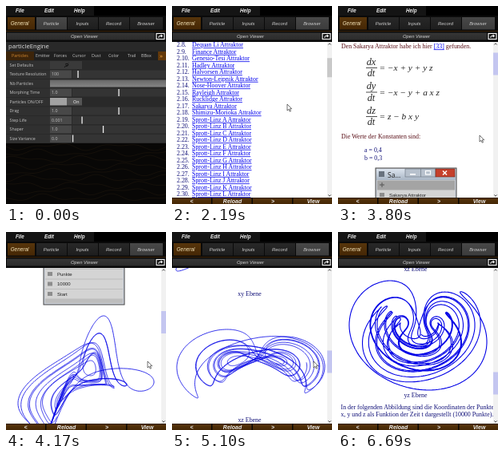
Animation of 200x248 px, one loop 6980 ms. Source, as an HTML page:

```html
<!DOCTYPE html>
<html lang="de">
<head>
<meta charset="utf-8">
<title>Particle engine browser</title>
<style>
  html, body { margin: 0; width: 100%; height: 100%; overflow: hidden; background: #080808; }
  svg { display: block; width: 100vw; height: 100vh; }
  text { white-space: pre; }
  .ui { font: italic 5.9px "Liberation Sans", Arial, sans-serif; fill: #cfcfcf; }
  .strong { font-size: 6.3px; font-weight: bold; fill: #eee; }
  .foot { font-size: 7px; }
  .par { font: 5.3px "Open Sans", "Noto Sans", sans-serif; fill: #c4c4c4; }
  .doc { font: 7.9px "Liberation Serif", "Times New Roman", serif; fill: #101078; }
  .link { fill: #0000ee; text-decoration: underline; }
  .math { font: italic 11.3px "Liberation Serif", "Times New Roman", serif; fill: #222; }
  .curve { fill: none; stroke: #0000e6; stroke-linejoin: round; }
</style>
</head>
<body>
<svg id="stage" viewBox="0 0 200 248"></svg>
<script>
const LOOP = 6980;
const VIEW = { top: 45, height: 195 };
const stage = document.getElementById("stage");

const rect = (x, y, w, h, fill, extra = "") =>
  `<rect x="${x}" y="${y}" width="${w}" height="${h}" fill="${fill}" ${extra}/>`;
const text = (x, y, s, cls, extra = "") =>
  `<text x="${x}" y="${y}" class="${cls}" ${extra}>${s}</text>`;
const mid = (x, y, s, cls, extra = "") => text(x, y, s, cls, `text-anchor="middle" ${extra}`);
const path = (d, extra) => `<path d="${d}" ${extra}/>`;
const gradient = (id, a, b) =>
  `<linearGradient id="${id}" x2="0" y2="1"><stop stop-color="${a}"/><stop offset="1" stop-color="${b}"/></linearGradient>`;

// --- Application frame -------------------------------------------------

function header() {
  const tabs = [["General", 2, 34, 17], ["Particle", 38, 38, 56.5], ["Inputs", 77, 38, 95.5],
                ["Record", 116, 38, 134.5], ["Browser", 155, 41, 175]];
  return rect(0, 0, 200, 45, "#0a0a0a") + rect(0, 0, 110, 12, "#141414") + rect(110, 0, 90, 12, "#000") +
    [["File", 12], ["Edit", 48], ["Help", 85]].map(([s, x]) => text(x, 8, s, "ui strong")).join("") +
    tabs.map(([s, x, w, c], i) =>
      rect(x, 14, w, 15.5, i ? "url(#dark)" : "url(#brown)", `id="tab${i}"`) +
      mid(c, 24, s, "ui", i ? "" : 'style="font-size:6.4px;fill:#f6e6bb"')).join("") +
    rect(0, 31, 200, 1, "#3a2207") +
    rect(1, 33.5, 185, 9, "url(#bar)") + mid(98, 40.3, "Open Viewer", "ui") +
    rect(188, 34.5, 10, 7, "#080808", 'stroke="#f4f4f4" stroke-width="1.2"') +
    path("M191 40v-1.5q0-1 1-1h3M193.5 35.8l1.9 1.7-1.9 1.7", 'fill="none" stroke="#f4f4f4" stroke-width="1.1"');
}

function parameters() {
  const names = ["Set Defaults", "Texture Resolution", "Nb Particles", "Morphing Time",
    "Particles ON/OFF", "Drag", "Step Life", "Shaper", "Size Variance"];
  const sliders = { 1: ["100", 90], 3: ["1.0", 141], 5: ["1.0", 141], 6: ["0.001", 95], 7: ["1.0", 121.5], 8: ["0.0", 83.5] };
  const pages = [["Particles", 7], ["Emitter", 37], ["Forces", 60], ["Cursor", 83], ["Dust", 107],
                 ["Color", 128], ["Trail", 152], ["BBox", 169]];
  let out = rect(0, 45, 200, 127, "#292929") +
    text(3, 53.3, "particleEngine", "par", 'style="font-size:7.7px;fill:#e2e2e2"') +
    rect(0, 57, 200, 11, "#202020") + rect(0, 57, 35, 11, "#3c240a") + rect(190, 57, 10, 11, "#63390a") +
    pages.map(([s, x], i) => `<svg x="${x}" y="57" width="${i ? 17.5 : 30}" height="11">` +
      text(0, 7.3, s, "par", i ? "" : 'style="fill:#d38a32"') + "</svg>").join("") +
    text(192, 64.8, "»", "par", 'style="font-size:8px;fill:#f0a540"');
  names.forEach((name, i) => {
    const y = 69 + i * 11.5;
    out += rect(0, y, 55, 10.5, "#303030") + text(4.5, y + 6.9, name, "par");
    if (i === 0) {
      out += rect(55, y, 40, 10, "#3a3a3a") +
        path(`M73 ${y + 8}l2-2.5 2 .5M74 ${y + 4}l3-1 1 2-3 1.5M78 ${y + 2}h.5`, 'fill="none" stroke="#111" stroke-width="1"');
    } else if (i === 2) {
      out += rect(55, y + .5, 145, 9, "url(#steel)");
    } else if (i === 4) {
      out += rect(55, y, 21, 9.5, "#a2a2a2") + rect(76, y, 19, 9.5, "#555") + text(84, y + 6.9, "On", "par", 'style="fill:#fff"');
    } else {
      const [value, x] = sliders[i];
      out += rect(55, y, 27, 10, "#484848") + text(57, y + 6.9, value, "par") +
        rect(83, y, 117, 10, "#343434") + rect(x - .6, y + .5, 1.3, 9, "#eee");
    }
  });
  out += rect(0, 172, 200, 76, "#080706");
  for (let k = 0; k < 9; k++) {
    let d = "";
    for (let x = 0; x <= 200; x += 5) {
      const y = 176 + k * 8 + 3 * Math.sin(x / 13 + k * 1.7) + 2 * Math.sin(x / 7 - k);
      d += `${d ? "L" : "M"}${x} ${y.toFixed(1)}`;
    }
    out += path(d, 'fill="none" stroke="#15100a" stroke-width="1"');
  }
  return out;
}

function footer() {
  return rect(0, 240, 200, 8, "#090603") +
    [["&lt;", 0, 24.5], ["Reload", 50.5, 75.5], ["&gt;", 101, 126], ["View", 151.5, 176.5]].map(([s, x, c]) =>
      rect(x, 240.5, 49, 7.5, "url(#brown)") + mid(c, 246.6, s, "ui strong foot")).join("");
}

// --- Browser pages -----------------------------------------------------

function listPage() {
  const names = ["Aizawa", "Anishchenko-Astakhov", "Arneodo", "Bouali", "Burke-Shaw", "Chen-Celikovsky", "Coullet",
    "Dequan Li", "Finance", "Genesio-Tesi", "Hadley", "Halvorsen", "Newton-Leipnik", "Nose-Hoover", "Rayleigh",
    "Rucklidge", "Sakarya", "Shimizu-Morioka", ...[..."ABCDEFGHIJKLMNOPQRS"].map(s => "Sprott-Linz " + s)];
  return text(5, 70, "Seltsame Attraktoren", "doc", 'style="font-size:13px"') +
    text(6, 92, "1.", "doc") + text(25, 92, "Einleitung", "doc link") +
    text(6, 104, "2.", "doc") + text(25, 104, "Attraktoren", "doc link") +
    names.map((s, i) => {
      const y = 117.8 + i * 8.5;
      return text(6, y, `2.${i + 1}.`, "doc") + text(25, y, s + " Attraktor", "doc link");
    }).join("");
}

// Euler run of the Sakarya system, without its slow start along the z axis
function trajectory() {
  const a = .4, b = .3, h = .004, skip = 1000, steps = 15000, pts = [];
  let x = 1, y = -1, z = 1;
  for (let n = 0; n < steps; n++) {
    [x, y, z] = [x + h * (-x + y + y * z), y + h * (-x - y + a * x * z), z + h * (z - b * x * y)];
    if (n >= skip && n % 2 === 0) pts.push([x, y, z]);
  }
  return pts;
}

function plot(pts, project, [x0, y0, x1, y1], width) {
  const flat = pts.map(project);
  const range = i => flat.reduce(([lo, hi], p) => [Math.min(lo, p[i]), Math.max(hi, p[i])], [Infinity, -Infinity]);
  const [ul, uh] = range(0), [vl, vh] = range(1);
  const d = flat.map(([u, v]) =>
    (x0 + (u - ul) / (uh - ul) * (x1 - x0)).toFixed(1) + " " + (y1 - (v - vl) / (vh - vl) * (y1 - y0)).toFixed(1)).join("L");
  return path("M" + d, `class="curve" stroke-width="${width}"`);
}

function dialog() {
  let out = rect(47, 266, 101, 172, "#c9ced6", 'stroke="#444" stroke-width="1"') +
    rect(48, 267, 99, 14, "url(#title)") + rect(51, 270, 7, 7, "#68727e") +
    text(62, 277.5, "Sa...", "par", 'style="font-size:8.5px;fill:#222"') +
    rect(84, 267, 38, 10, "#b7c1cd", 'stroke="#65707c" stroke-width=".6"') + rect(103, 267, .6, 10, "#65707c") +
    rect(122, 267, 24, 10, "#c5402c", 'stroke="#6b261d" stroke-width=".6"') +
    rect(90, 273, 7, 1.6, "#fff") + rect(109.5, 269.5, 6, 4.5, "none", 'stroke="#fff" stroke-width="1.2"') +
    path("M131 269.5l5 5m0-5l-5 5", 'stroke="#fff" stroke-width="1.5"') +
    rect(49, 281, 97, 155, "#bdbdbd") + rect(49, 282, 97, 11, "#a4a4a4") +
    path("M52 287h6m-3-3v6", 'stroke="#555" stroke-width="1"');
  ["Sakarya Attraktor", "Parameter", "a = 0,4", "b = 0,3", "Startwerte", "x = 1", "y = -1", "z = 1", "Punkte", "10000", "Start"].forEach((s, i) => {
    const y = 294 + i * 12.5;
    out += rect(49, y, 97, 11.5, "#d4d4d4") + rect(52, y + 3, 6, 5, "#8d8d8d") +
      text(64, y + 7.8, s, "par", 'style="font:6px Liberation Sans,Arial,sans-serif;fill:#222"');
  });
  return out;
}

function articlePage() {
  const pts = trajectory();
  const equations = [["x", "= −x + y + y z"], ["y", "= −x − y + a x z"], ["z", "= z − b x y"]];
  const dark = 'style="fill:#5a1018"';
  return text(4, 82, "Sakarya Attraktor", "doc", 'style="font-size:12px;font-weight:bold"') +
    text(4, 116.3, 'Den Sakarya Attraktor habe ich hier <tspan class="link">[33]</tspan> gefunden.', "doc", dark) +
    equations.map(([v, s], i) => {
      const y = 140.5 + i * 30.5;
      return mid(41.5, y - 4, "d" + v, "math", 'style="font-size:12.3px"') + rect(35, y - .4, 14, .8, "#222") +
        mid(41.5, y + 10.5, "dt", "math", 'style="font-size:12.3px"') + text(51.5, y + 3.5, s, "math");
    }).join("") +
    text(4, 229, "Die Werte der Konstanten sind:", "doc", dark) +
    text(33, 246, "a = 0,4", "doc") + text(33, 256, "b = 0,3", "doc") +
    dialog() +
    plot(pts, ([x, y, z]) => [(y - x) * .866, z - (x + y) / 2], [15, 452, 185, 607], .8) +
    mid(97, 614.5, "3D Ansicht (Isometrie)", "doc") +
    plot(pts, ([x, y]) => [x, y], [5, 646, 192, 742], .8) +
    mid(97, 772.5, "xy Ebene", "doc") +
    plot(pts, ([x, , z]) => [x, z], [6, 815, 191, 901], .8) +
    mid(97, 930.5, "xz Ebene", "doc") +
    plot(pts, ([, y, z]) => [y, z], [14, 943, 186, 1080], 1.1) +
    mid(97, 1088.5, "yz Ebene", "doc") +
    text(3.5, 1104, "In der folgenden Abbildung sind die Koordinaten der Punkte", "doc") +
    text(3.5, 1113, "x, y und z als Funktion der Zeit t dargestellt (10000 Punkte).", "doc");
}

// --- Scene -------------------------------------------------------------

stage.innerHTML =
  "<defs>" + gradient("brown", "#57350b", "#452705") + gradient("dark", "#282828", "#1e1e1e") +
  gradient("lit", "#484848", "#3c3c3c") + gradient("bar", "#363636", "#2b2b2b") +
  gradient("steel", "#676767", "#858585") + gradient("title", "#dce4ee", "#a9b6c5") +
  `<clipPath id="view">${rect(0, VIEW.top, 194, VIEW.height, "#fff")}</clipPath></defs>` +
  header() + `<g id="params">${parameters()}</g>` +
  `<g id="browser">${rect(0, VIEW.top, 200, VIEW.height, "#fff")}` +
  `<g clip-path="url(#view)"><g id="list">${listPage()}</g><g id="article">${articlePage()}</g></g>` +
  rect(194, VIEW.top, 6, VIEW.height, "#f1f1f1") + rect(194, 49, 6, 28, "#c9c9c9", 'id="thumb"') +
  path("M195.3 48.5l1.7-1.7 1.7 1.7M195.3 236.5l1.7 1.7 1.7-1.7", 'fill="none" stroke="#404040" stroke-width="1"') +
  footer() + "</g>" +
  '<g id="cursor"><circle id="glow" cx="1" cy="3" r="5.5" fill="#ffe000" opacity=".8"/>' +
  path("M0 0v8l1.9-1.7 1.3 2.9 1.3-.6-1.3-2.8h2.5z", 'fill="#fff" stroke="#111" stroke-width=".6"') + "</g>";

const $ = id => document.getElementById(id);
const show = (id, on) => $(id).setAttribute("display", on ? "inline" : "none");

const CLICKS = [[1210, 1240], [2800, 2850]];
const LIST_SCROLL = [[0, 0], [1990, 32], [2060, 63], [2130, 95], [2190, 126]];
const ARTICLE_SCROLL = [[0, 0], [3800, 63], [3870, 126], [3930, 189], [4000, 221], [4070, 284], [4130, 347], [4200, 378],
  [4370, 441], [4400, 473], [4470, 504], [4830, 567], [4870, 599], [4930, 630], [5100, 693], [5130, 756],
  [5530, 788], [5600, 819], [5670, 851], [5730, 882]];
const CURSOR = [[660, 199, 35], [720, 184, 29], [840, 160.5, 19], [1510, 160.5, 19], [1650, 163, 50], [1900, 146, 119],
  [2190, 144, 123], [2490, 144, 123], [2620, 95, 126], [2770, 60, 122], [2880, 60, 122], [3030, 105, 140],
  [3180, 154, 158], [3210, 158, 159], [3300, 186, 163], [3400, 177, 162], [5960, 177, 162], [5990, 176.5, 162.5],
  [6160, 176.5, 162.5], [6260, 176, 163], [6430, 176, 163], [6510, 184, 177], [6600, 177, 209], [6690, 168, 238]];

const stepAt = (keys, t) => keys.filter(([at]) => at <= t).pop()[1];

function cursorAt(t) {
  const i = CURSOR.findIndex(([at]) => at > t);
  const [t0, x0, y0] = CURSOR[i - 1], [t1, x1, y1] = CURSOR[i];
  const p = (t - t0) / (t1 - t0);
  return [x0 + (x1 - x0) * p, y0 + (y1 - y0) * p];
}

function draw(t) {
  const browsing = t >= 1240, reading = t >= 2850;
  show("params", !browsing);
  show("browser", browsing);
  show("list", !reading);
  show("article", reading);
  $("tab1").setAttribute("fill", browsing ? "url(#dark)" : "url(#lit)");
  $("tab4").setAttribute("fill", t >= 780 ? "url(#lit)" : "url(#dark)");

  const scroll = stepAt(reading ? ARTICLE_SCROLL : LIST_SCROLL, t);
  $(reading ? "article" : "list").setAttribute("transform", `translate(0 ${-scroll})`);
  const thumb = $("thumb");
  thumb.setAttribute("y", 49.5 + scroll / (reading ? 7 : 8));
  thumb.setAttribute("height", reading ? 28 : 24);
  thumb.setAttribute("fill", t >= 3800 ? "#c4c6f0" : "#c9c9c9");

  const visible = t >= 660 && t < 6690;
  show("cursor", visible);
  if (visible) $("cursor").setAttribute("transform", `translate(${cursorAt(t).join(" ")})`);
  show("glow", CLICKS.some(([a, b]) => t >= a && t < b));
}

const start = performance.now();
function tick() {
  draw((performance.now() - start) % LOOP);
  requestAnimationFrame(tick);
}
tick();
</script>
</body>
</html>
```
